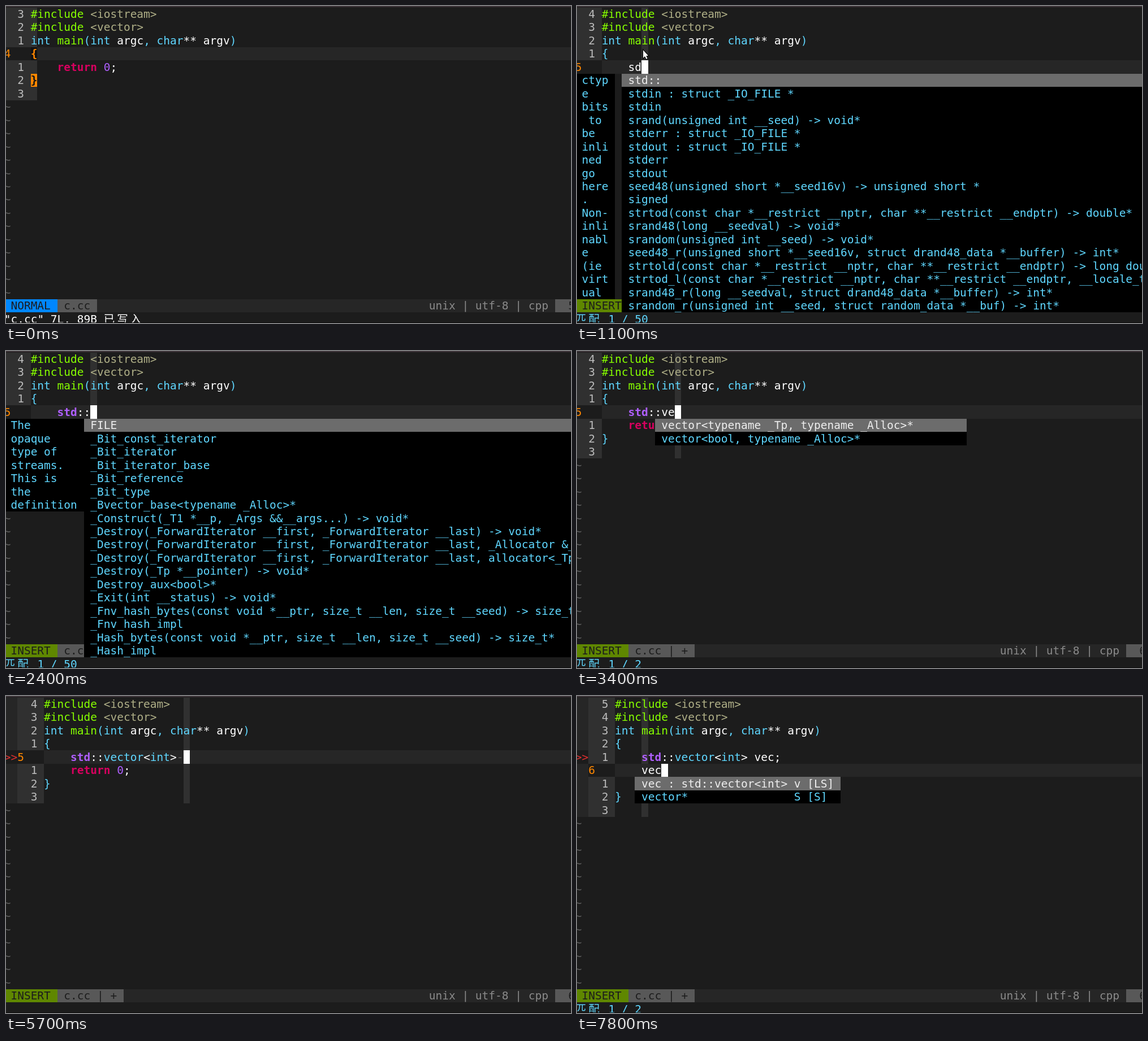
Recreate the animation shown at these times as an HTML page with a canvas. Size 999 by 561 pixels, loop 8 s.

```html
<!DOCTYPE html>
<html lang="en">
<head>
<meta charset="utf-8">
<title>Code completion in a terminal editor</title>
<style>
html, body { margin: 0; width: 100%; height: 100%; overflow: hidden; background: #1c1c1c; }
canvas { display: block; }
</style>
</head>
<body>
<canvas id="stage" width="999" height="561"></canvas>
<script>
const ctx = document.getElementById('stage').getContext('2d');
const LOOP = 8000, CELL_W = 11.735, CELL_H = 23.47, LEFT = -3.3, TOP = 2.6, END_COL = 86;
const STATUS_ROW = 22, MESSAGE_ROW = 23;
const FONT = '19.49px "DejaVu Sans Mono", "Noto Sans CJK SC", "Noto Sans CJK", monospace';
const C = {
  bg: '#1c1c1c', line: '#262626', gutter: '#303030', number: '#bcbcbc', orange: '#ff8700',
  text: '#ffffff', cyan: '#5fd7ff', green: '#87ff00', tan: '#afaf87', purple: '#af5fff',
  pink: '#d7005f', dim: '#5f5f5f', black: '#000000', selected: '#6c6c6c', sign: '#dc2f2f',
  block: '#585858', status: '#8a8a8a', normal: '#0087ff', insert: '#5f8700'
};

const lines = s => s.trim().split('\n');
const STDIO = lines(`
std::
stdin : struct _IO_FILE *
stdin
stderr : struct _IO_FILE *
stdout : struct _IO_FILE *
stderr
stdout`);
const STRTO = 'const char *__restrict __nptr, char **__restrict __endptr';
const STRTOD = `strtod(${STRTO}) -> double*`;
const STRTOLD = `strtold(${STRTO}) -> long double*`;
const STRTOD_L = `strtod_l(${STRTO}, __locale_t __loc) -> double*`;

const sdItems = [
  ...STDIO.slice(0, 3), 'srand(unsigned int __seed) -> void*', ...STDIO.slice(3),
  'seed48(unsigned short *__seed16v) -> unsigned short *', 'signed', STRTOD,
  ...lines(`
srand48(long __seedval) -> void*
srandom(unsigned int __seed) -> void*
seed48_r(unsigned short *__seed16v, struct drand48_data *__buffer) -> int*`),
  STRTOLD, STRTOD_L,
  'srand48_r(long __seedval, struct drand48_data *__buffer) -> int*',
  'srandom_r(unsigned int __seed, struct random_data *__buf) -> int*'
];
const stdItems = [
  ...STDIO, STRTOD, STRTOLD, STRTOD_L, STRTOD_L.replace('strtod', 'strtold'),
  ...lines(`
STA_DEL
pthread_setattr_default_np(const pthread_attr_t *__attr) -> int*
STDC_HEADERS
STA_MODE
STA_FREQHOLD
STA_PPSWANDER`)
];
const scopeItems = lines(`
FILE
_Bit_const_iterator
_Bit_iterator
_Bit_iterator_base
_Bit_reference
_Bit_type
_Bvector_base<typename _Alloc>*
_Construct(_T1 *__p, _Args &&__args...) -> void*
_Destroy(_ForwardIterator __first, _ForwardIterator __last) -> void*
_Destroy(_ForwardIterator __first, _ForwardIterator __last, _Allocator &__alloc) -> void*
_Destroy(_ForwardIterator __first, _ForwardIterator __last, allocator<_Tp> &) -> void*
_Destroy(_Tp *__pointer) -> void*
_Destroy_aux<bool>*
_Exit(int __status) -> void*
_Fnv_hash_bytes(const void *__ptr, size_t __len, size_t __seed) -> size_t*
_Fnv_hash_impl
_Hash_bytes(const void *__ptr, size_t __len, size_t __seed) -> size_t*
_Hash_impl`);
const vItems = lines(`
vector<typename _Tp, typename _Alloc>*
vector<bool, typename _Alloc>*
value_compare
valarray<typename _Tp>*
vfprintf(FILE *__s, const char *__format, va_list __arg) -> int*
vfscanf(FILE *__s, const char *__format, va_list __arg) -> int*
vprintf(const char *__format, va_list __arg) -> int*
vscanf(const char *__format, va_list __arg) -> int*
vsnprintf(char *__s, size_t __maxlen, const char *__format, va_list __arg) -> int*
vsprintf(char *__s, const char *__format, va_list __arg) -> int*
vsscanf(const char *__s, const char *__format, va_list __arg) -> int*
vfwprintf(FILE *__s, const wchar_t *__format, va_list __arg) -> int*
vfwscanf(FILE *__s, const wchar_t *__format, va_list __arg) -> int*
vswprintf(wchar_t *__s, size_t __n, const wchar_t *__format, va_list __arg) -> int*
vswscanf(const wchar_t *__s, const wchar_t *__format, va_list __arg) -> int*
vwprintf(const wchar_t *__format, va_list __arg) -> int*
vwscanf(const wchar_t *__format, va_list __arg) -> int*
move(_Tp &&__t) -> typename remove_reference<_Tp>::type &&*`);
const intItems = lines(`
int
int8_t
int16_t
int32_t
int64_t
intptr_t
intmax_t
initstate(unsigned int __seed, char *__statebuf, size_t __statelen) -> char *`);
const sdInfo = ['ctyp', 'e', 'bits', ' to', 'be', 'inli', 'ned', 'go', 'here', '.',
  'Non-', 'inli', 'nabl', 'e', '(ie', 'virt', 'ual'];
const scopeInfo = ['The', 'opaque', 'type of', 'streams.', 'This is', 'the', 'definition'];

const menu = (col, end, items) => ({ col, end, items });
const match = (n, total) => `匹配 ${n} / ${total}`;
const sdMenu = menu(7, END_COL, sdItems), scopeMenu = menu(12, END_COL, scopeItems);
const vecMenu = menu(12, 59, vItems.slice(0, 2));
const written = '"c.cc" 7L, 89B 已写入';
const VEC = 'std::vector<int>';

// typed: lines being written; cursor: offset in the last one; guide: highlighted column
const steps = [
  { at: 0, typed: [], guide: 4, mode: 'NORMAL', msg: written },
  { at: 200, typed: [''], guide: 4, mode: 'NORMAL', msg: written },
  { at: 300, typed: [''], guide: 4, msg: written },
  { at: 700, typed: ['s'], guide: 8, msg: written },
  { at: 900, typed: ['sd'] },
  { at: 1000, typed: ['sd'], menu: sdMenu, msg: match(1, 50), mouse: true },
  { at: 1100, typed: ['sd'], menu: sdMenu, info: sdInfo, infoEnd: 6, msg: match(1, 50), mouse: true },
  { at: 1500, typed: ['s'], msg: match(1, 50) },
  { at: 1700, typed: ['st'] },
  { at: 1900, typed: ['std'], menu: menu(7, END_COL, stdItems), msg: match(1, 17) },
  { at: 2100, typed: ['std:'] },
  { at: 2200, typed: ['std::'] },
  { at: 2300, typed: ['std::'], menu: scopeMenu, msg: match(1, 50) },
  { at: 2400, typed: ['std::'], menu: scopeMenu, info: scopeInfo, infoEnd: 12, msg: match(1, 50) },
  { at: 3000, typed: ['std::v'], menu: menu(12, END_COL, vItems), msg: match(1, 50) },
  { at: 3400, typed: ['std::ve'], menu: vecMenu, msg: match(1, 2) },
  { at: 3500, typed: ['std::vec'], menu: vecMenu, msg: match(1, 2) },
  { at: 4200, typed: ['std::vector'] },
  { at: 4300, typed: ['std::vector<>'], cursor: 12, sign: true, underline: true },
  { at: 4900, typed: ['std::vector<in>'], cursor: 14, sign: true, underline: true,
    menu: menu(21, 37, ['int     [A]', 'include [A]']), msg: match(1, 2) },
  { at: 5000, typed: [VEC], cursor: 15, sign: true, underline: true },
  { at: 5100, typed: [VEC], cursor: 15, sign: true, underline: true,
    menu: menu(21, END_COL, intItems), msg: match(1, 8) },
  { at: 5300, typed: [VEC], sign: true },
  { at: 5700, typed: [VEC + ' '], sign: true },
  { at: 6800, typed: [VEC + ' vec'], sign: true, menu: menu(26, 42, ['vector  [A]']), msg: match(1, 1) },
  { at: 6900, typed: [VEC + ' vec;'], sign: true },
  { at: 7200, typed: [VEC + ' vec;', ''], guide: 6, sign: true },
  { at: 7500, typed: [VEC + ' vec;', 've'], guide: 10, sign: true },
  { at: 7800, typed: [VEC + ' vec;', 'vec'], guide: 10, sign: true, msg: match(1, 2),
    menu: menu(9, 40, ['vec : std::vector<int> v [LS]', 'vector*'.padEnd(23) + 'S [S]']) }
];

const syntax = [
  [/^#include/, C.green], [/^<(iostream|vector)>/, C.tan], [/^(int|char|vector)\b/, C.cyan],
  [/^(main|in)\b/, C.green], [/^return\b/, C.pink, true], [/^std\b/, C.purple, true],
  [/^\d+/, C.purple], [/^[(){},]/, C.cyan], [/^ +$/, C.dim], [/^(\w+|.)/, C.text]
];

const colX = col => LEFT + col * CELL_W;
const rowY = row => TOP + row * CELL_H;

function fill(col, row, endCol, color, rows = 1) {
  const x = Math.round(colX(col)), y = Math.round(rowY(row));
  ctx.fillStyle = color;
  ctx.fillRect(x, y, Math.round(colX(endCol)) - x, Math.round(rowY(row + rows)) - y);
}

function write(text, col, row, color, bold) {
  ctx.font = (bold ? 'bold ' : '') + FONT;
  ctx.fillStyle = color;
  const y = rowY(row) + 18.3;
  if (!/[^\x00-\x7f]/.test(text)) return ctx.fillText(text, colX(col), y);
  for (const ch of text) {
    ctx.fillText(ch, colX(col), y);
    col += ch > '\x7f' ? 2 : 1;
  }
}

function writeCode(text, col, row) {
  while (text) {
    const [rule, color, bold] = syntax.find(([re]) => re.test(text));
    const token = text.match(rule)[0];
    write(color === C.dim ? token.replace(/ /g, '-') : token, col, row, color, bold);
    text = text.slice(token.length);
    col += token.length;
  }
}

function drawBuffer(s) {
  const gutter = s.sign ? 2 : 0, base = gutter + 4;
  const code = ['#include <iostream>', '#include <vector>', 'int main(int argc, char** argv)', '{',
    ...s.typed.map(t => '    ' + t), '    return 0;', '}', ''];
  const curRow = 3 + s.typed.length;
  const last = s.typed[s.typed.length - 1];
  const curCol = last === undefined ? base : base + 4 + (s.cursor ?? last.length);
  const guide = s.guide ?? curCol;

  code.forEach((text, row) => {
    const current = row === curRow, signed = s.sign && row === 4;
    if (s.sign) fill(0, row, 2, signed ? C.bg : C.line);
    if (signed) write('>>', 0, row, C.sign);
    if (current) {
      fill(base, row, END_COL, C.line);
      write(String(row + 1), gutter, row, C.orange);
    } else {
      fill(gutter, row, base, C.gutter);
      fill(guide, row, guide + 1, C.gutter);
      write(String(Math.abs(row - curRow)), gutter + 2, row, C.number);
    }
    const indent = text.startsWith('    ') && text.trim() ? 4 : 0;
    writeCode(text.slice(indent), base + indent, row);
  });
  for (let row = code.length; row < STATUS_ROW; row++) write('~', 0, row, C.dim);

  if (s.underline) {
    ctx.fillStyle = C.cyan;
    ctx.fillRect(colX(base + 9), rowY(4) + 20, 2 * CELL_W, 1.3);
  }
  if (!s.typed.length) {
    fill(base, 3, base + 1, '#121212');
    write('{', base, 3, C.orange, true);
    fill(base, 5, base + 1, C.orange);
    write('}', base, 5, '#121212', true);
  } else {
    fill(curCol, curRow, curCol + 1, C.text);
    write(code[curRow][curCol - base] || '', curCol, curRow, C.bg);
  }
  return curRow;
}

function drawStatus(s) {
  const mode = s.mode || 'INSERT', saved = !s.typed.length;
  fill(0, STATUS_ROW, END_COL, C.line);
  fill(0, STATUS_ROW, 8, mode === 'NORMAL' ? C.normal : C.insert);
  write(mode, 1, STATUS_ROW, C.bg);
  fill(8, STATUS_ROW, saved ? 14 : 18, C.block);
  write(saved ? 'c.cc' : 'c.cc | +', 9, STATUS_ROW, C.bg);
  write('unix | utf-8 | cpp', 64, STATUS_ROW, C.status);
  fill(83, STATUS_ROW, END_COL, C.block);
  write(saved ? '5' : '6', 85, STATUS_ROW, C.bg);
  if (s.msg) write(s.msg, 0, MESSAGE_ROW, s.msg === written ? C.text : C.cyan);
}

function drawMenus(s, row) {
  if (s.info) {
    fill(0, row, s.infoEnd, C.black, s.info.length);
    s.info.forEach((t, i) => write(t, 1, row + i, C.cyan));
    if (s.infoEnd < s.menu.col) fill(s.infoEnd, row, s.menu.col, C.bg, s.info.length);
  }
  if (!s.menu) return;
  const { col, end, items } = s.menu;
  fill(col, row, end, C.black, items.length);
  fill(col, row, end, C.selected);
  items.forEach((t, i) => write(t, col + 1, row + i, i ? C.cyan : '#eeeeee'));
}

function drawMouse() {
  ctx.beginPath();
  [[117, 78], [117, 92], [120, 89], [122.5, 94], [124.5, 93], [122.3, 88.3], [126, 88]]
    .forEach(([x, y]) => ctx.lineTo(x, y));
  ctx.closePath();
  ctx.strokeStyle = C.black;
  ctx.lineWidth = 2;
  ctx.stroke();
  ctx.fillStyle = C.text;
  ctx.fill();
}

function draw(s) {
  ctx.fillStyle = C.bg;
  ctx.fillRect(0, 0, 999, 561);
  const curRow = drawBuffer(s);
  drawStatus(s);
  drawMenus(s, curRow + 1);
  if (s.mouse) drawMouse();
  ctx.fillStyle = '#3a3236';
  ctx.fillRect(0, 0, 999, 2);
  ctx.fillStyle = '#0c0c0c';
  ctx.fillRect(0, 560, 999, 1);
}

let shown;
const start = performance.now();
function tick() {
  const t = (performance.now() - start) % LOOP;
  const step = steps.findLast(s => s.at <= t);
  if (step !== shown) draw(shown = step);
  requestAnimationFrame(tick);
}
tick();
</script>
</body>
</html>
```
